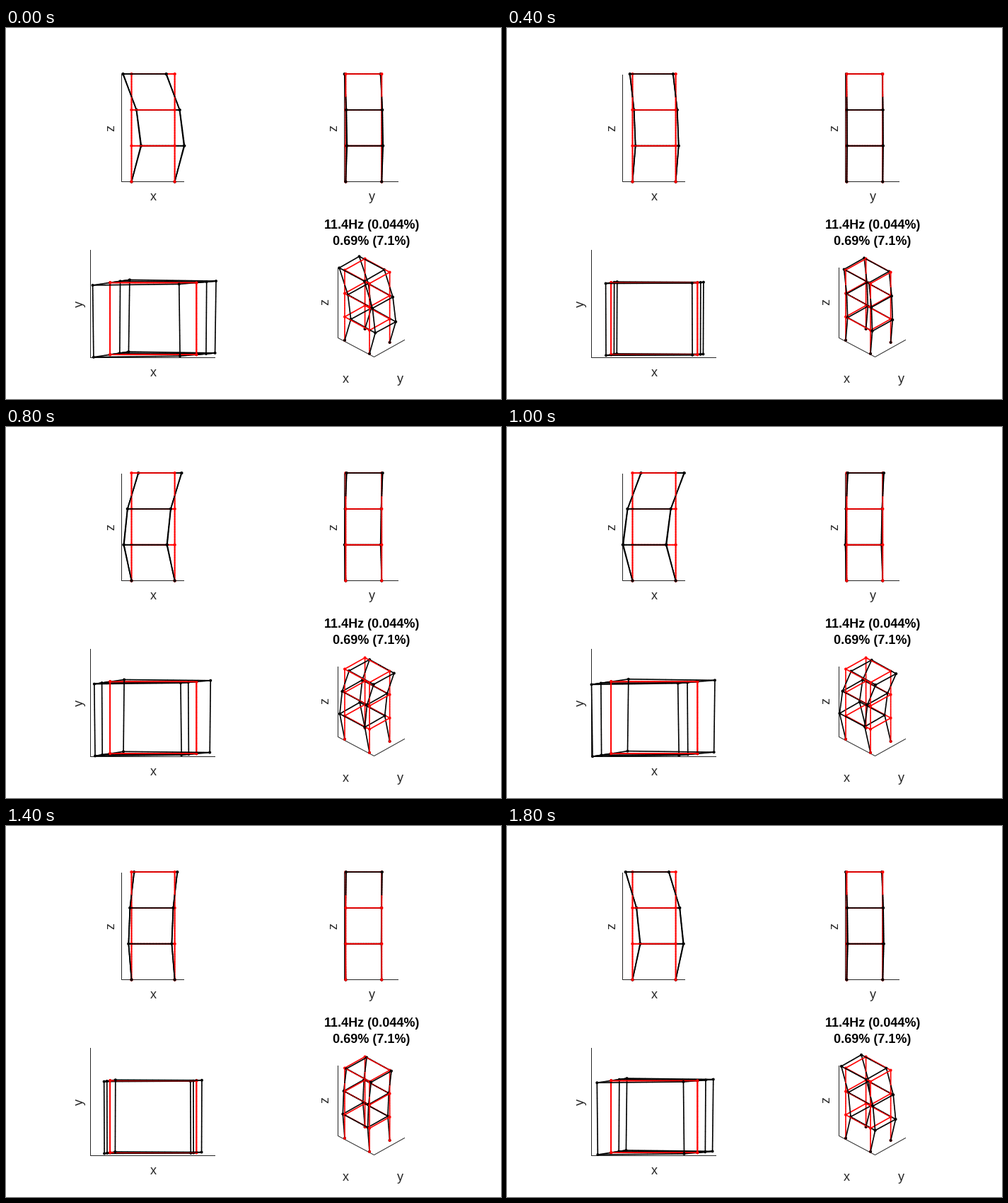
Write a matplotlib script that moves like this. It is 700 px wide and 525 px high and loops after 2 s.

```python
import numpy as np
import matplotlib.pyplot as plt
from matplotlib.animation import FuncAnimation
from matplotlib.collections import PolyCollection

W, H, DPI = 700, 525, 100
FRAMES, INTERVAL = 10, 200
PX = 72 / DPI                      # one pixel in points
WIDTH, DEPTH = 1.2, 1.0            # footprint in storey heights
MODE = np.array([0, 27, 14, -24]) / 102
PIECES = 14                        # parts per bar, for depth sorting
LINE, DOT = 1.65, 4.0              # bar width and dot diameter in pixels

X0, X1, Y0, Y1, Z1 = -0.27, 1.46, -0.04, 1.45, 2.98
TRIAD = [(X0, Y0, Z1), (X0, Y0, 0), (X1, Y0, 0), (X1, Y1, 0)]
PLAN = [(X0, Y1, 0), (X0, Y0, 0), (X1, Y0, 0)]

# origin in pixels, pixel steps for x, y and z, direction to the viewer, axis path
VIEWS = [
    ((177.5, 217.5), [(50.9, 0), (0, 0), (0, -50.8)], (0, -1, 0), TRIAD),
    ((480.4, 217.5), [(0, 0), (50.9, 0), (0, -50.8)], (1, 0, 0), TRIAD),
    ((147.2, 462.2), [(101.8, 0), (0, -101.8), (0, 0)], (0, 0, 1), PLAN),
    ((479.0, 441.8), [(29.2, 15.9), (28.6, -16), (0, -33.1)],
     (0.58, -0.58, 0.56), TRIAD),
]

CORNERS = [(0, 0), (WIDTH, 0), (WIDTH, DEPTH), (0, DEPTH)]
REST = np.array([(x, y, z) for z in range(4) for x, y in CORNERS], float)
BARS = [(4 * s + c, 4 * s + c + 4) for s in range(3) for c in range(4)]
BARS += [(4 * s + c, 4 * s + (c + 1) % 4) for s in (1, 2, 3) for c in range(4)]

turn = np.linspace(0, 2 * np.pi, 16, endpoint=False)
DISC = DOT / 2 * np.column_stack([np.cos(turn), np.sin(turn)])


def displaced(amount, base=0.0):
    """Nodes of the frame; base tilts the feet slightly, to settle their depth."""
    shape = MODE.copy()
    shape[0] = base * shape[1]
    phi = amount * np.repeat(shape, 4)
    x, y, _ = REST.T
    shift = np.column_stack([phi * (1 + 0.054 * (y - 0.5)),
                             phi * (0.15 - 0.065 * x / WIDTH),
                             np.zeros(len(x))])
    return REST + shift


def project(points, view):
    return np.asarray(view[0]) + np.asarray(points) @ np.array(view[1])


def strip(a, b):
    """Quad around a to b, a little longer so that neighbours leave no seam."""
    along = (b - a) / max(np.hypot(*(b - a)), 1e-9)
    side = LINE / 2 * np.array([-along[1], along[0]])
    a, b = a - 0.2 * along, b + 0.2 * along
    return np.array([a + side, b + side, b - side, a - side])


def primitives(amount, color, view):
    """Bar pieces and node dots as (depth, polygon, color)."""
    pos = project(displaced(amount), view)
    near = displaced(amount, 0.02) @ np.array(view[2])
    t = np.linspace(0, 1, PIECES + 1)
    parts = []
    for a, b in BARS:
        if np.hypot(*(pos[b] - pos[a])) < 0.01:
            continue
        line = pos[a] + t[:, None] * (pos[b] - pos[a])
        depth = near[a] + (t[:-1] + t[1:]) / 2 * (near[b] - near[a])
        for i, d in enumerate(depth):
            parts.append((d, strip(line[i], line[i + 1]), color))
    for p, d in zip(pos, near):
        parts.append((d, p + DISC, color))
    return parts


plt.rcParams["font.family"] = "Liberation Sans"
fig = plt.figure(figsize=(W / DPI, H / DPI), dpi=DPI, facecolor="white")
ax = fig.add_axes([0, 0, 1, 1])
ax.set(xlim=(0, W), ylim=(H, 0))
ax.axis("off")


def label(x, y, text, **style):
    style = {"color": "#262626", **style}
    ax.text(x, y, text, fontsize=18 * PX, ha="center", va="baseline",
            rotation_mode="anchor", **style)


for x, y, name in [(208.5, 243.5, "x"), (517.5, 243.5, "y"), (208.5, 493, "x"),
                   (480.5, 501.5, "x"), (557.5, 501.5, "y")]:
    label(x, y, name)
for x, y, name in [(153.5, 141, "z"), (468, 141, "z"),
                   (108.5, 390.5, "y"), (456.5, 387.5, "z")]:
    label(x, y, name, rotation=90)
label(517, 284.3, "11.4Hz (0.044%)", weight="bold", color="black")
label(516.7, 307.3, "0.69% (7.1%)", weight="bold", color="black")

models = []
for view in VIEWS:
    path = np.floor(project(view[3], view)) + 0.5
    ax.plot(*path.T, color="#262626", lw=PX, snap=False, zorder=1)
    model = PolyCollection([], linewidths=0, zorder=2)
    model.set_snap(False)
    models.append(ax.add_collection(model, autolim=False))


def draw(k):
    swing = np.cos(2 * np.pi * k / FRAMES)
    for view, model in zip(VIEWS, models):
        parts = primitives(0, "red", view) + primitives(swing, "black", view)
        parts.sort(key=lambda part: round(part[0], 6))
        _, shapes, colors = zip(*parts)
        model.set_verts(shapes)
        model.set_facecolor(colors)
    return models


anim = FuncAnimation(fig, draw, frames=FRAMES, interval=INTERVAL,
                     repeat=True, repeat_delay=0, blit=False)
plt.show()
```
